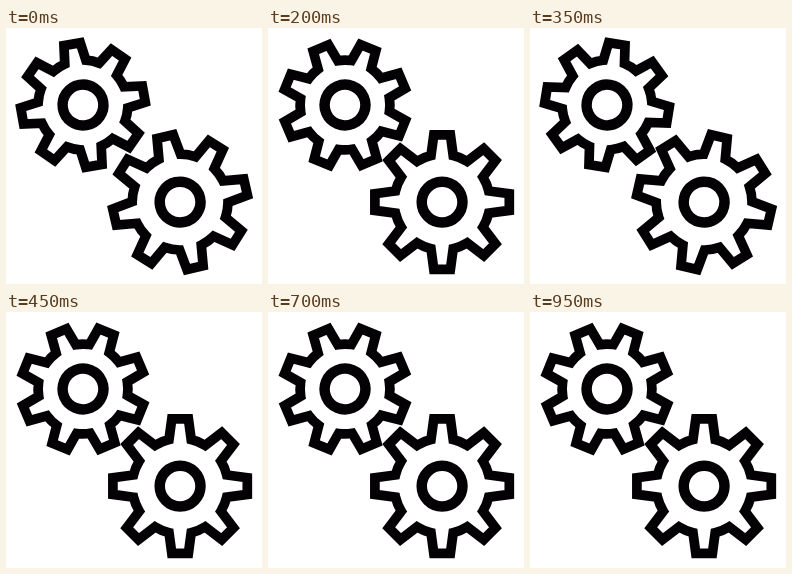
An HTML page for the animation above (1000 ms loop, 256 by 256 pixels).

```html
<!DOCTYPE html>
<html lang="en">
<head>
<meta charset="utf-8">
<title>Gears</title>
<style>
  html, body { margin: 0; height: 100%; overflow: hidden; background: #fff; }
  svg { display: block; width: 100vw; height: 100vh; }
  path, circle { fill: none; stroke: #030104; stroke-miterlimit: 10; }
  path { stroke-width: 9.7; }
  circle { stroke-width: 10.5; }
</style>
</head>
<body>
<svg viewBox="0 0 256 256">
  <g id="small"><path/><circle r="20.4"/></g>
  <g id="big"><path/><circle r="20.4"/></g>
</svg>
<script>
const TEETH = 8, PITCH = 360 / TEETH;
const POSES = 7;       // poses per tooth pitch
const TICK = 50;       // ms per picture
const RATE = 1.4;      // poses advanced per tick

// Closed outline of a gear: tapered teeth with flat tips, joined by arcs.
function outline(tip, tipHalf, base, baseHalf) {
  const r = Math.hypot(base, baseHalf);
  const tooth = [[-baseHalf, -base], [-tipHalf, -tip], [tipHalf, -tip], [baseHalf, -base]];
  const parts = [];
  for (let i = 0; i <= TEETH; i++) {
    const a = i * PITCH * Math.PI / 180, c = Math.cos(a), s = Math.sin(a);
    const [start, ...rest] = tooth.map(([x, y]) =>
      `${(x * c - y * s).toFixed(2)} ${(x * s + y * c).toFixed(2)}`);
    parts.push(i ? `A${r} ${r} 0 0 1 ${start}` : `M${start}`);
    if (i < TEETH) parts.push("L" + rest.join("L"));
  }
  return parts.join("") + "Z";
}

function makeGear(id, x, y, ...shape) {
  const g = document.getElementById(id);
  g.querySelector("path").setAttribute("d", outline(...shape));
  return angle => g.setAttribute("transform", `translate(${x} ${y}) rotate(${angle})`);
}

const turnSmall = makeGear("small", 77, 77, 61.8, 8.3, 43.6, 10.7);
const turnBig = makeGear("big", 174.1, 174.1, 67.2, 8.3, 46.6, 11.1);

function draw() {
  const tick = Math.floor(performance.now() % 1000 / TICK);
  const angle = Math.floor(RATE * tick + 2.3) * PITCH / POSES;
  turnSmall(PITCH / 2 - 0.5 + angle);
  turnBig(-angle);
  requestAnimationFrame(draw);
}
draw();
</script>
</body>
</html>
```
